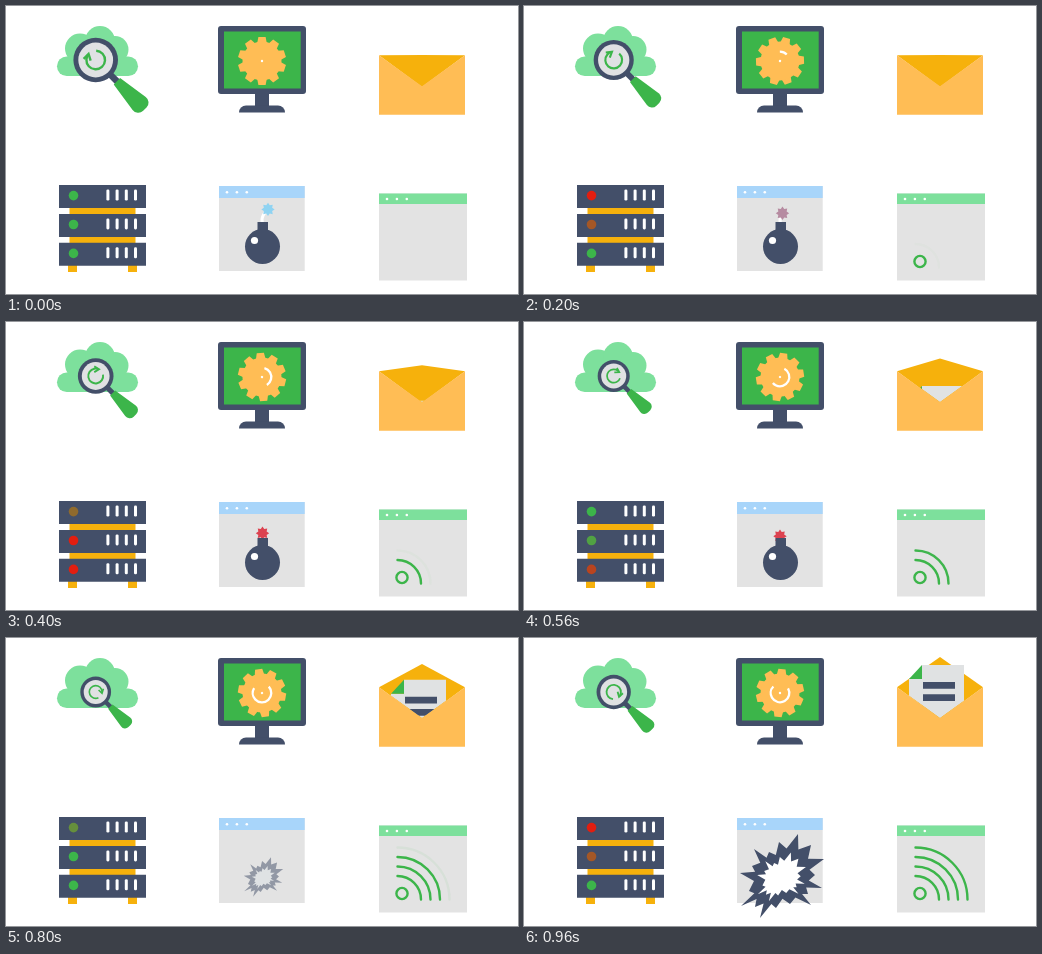
An HTML page with a canvas for the animation above (1 s loop, 512x288 px).

```html
<!DOCTYPE html>
<html lang="en">
<head>
<meta charset="utf-8">
<title>Security icons</title>
<style>
html, body { margin: 0; width: 100%; height: 100%; overflow: hidden; background: #fff; }
canvas { display: block; width: 512px; height: 288px; }
</style>
</head>
<body>
<canvas id="stage" width="512" height="288"></canvas>
<script>
const c = document.getElementById('stage').getContext('2d');
const LOOP = 1000, STEP = 40, TAU = Math.PI * 2, DEG = Math.PI / 180;
const NAVY = '#434f69', GREEN = '#3cb54a', MINT = '#7de09c', AMBER = '#f6b10c',
      ORANGE = '#ffbd55', GREY = '#e3e3e3', PAPER = '#e0e2e3', WHITE = '#fff', SKY = '#a8d5fa';

const clamp = v => Math.max(0, Math.min(1, v));
const ramp = (t, from, to) => clamp((t - from) / (to - from));
const mix = (a, b, k) => `rgb(${a.map((v, i) => Math.round(v + (b[i] - v) * k))})`;

function rect(x, y, x2, y2, color, radius = 0) {
  c.fillStyle = color;
  c.beginPath();
  c.roundRect(x, y, x2 - x, y2 - y, radius);
  c.fill();
}

function disc(x, y, r, color) {
  c.fillStyle = color;
  c.beginPath();
  c.arc(x, y, r, 0, TAU);
  c.fill();
}

function poly(points, color) {
  c.fillStyle = color;
  c.beginPath();
  points.forEach(([x, y]) => c.lineTo(x, y));
  c.closePath();
  c.fill();
}

function arc(x, y, r, from, to, color, width) {
  c.strokeStyle = color;
  c.lineWidth = width;
  c.beginPath();
  c.arc(x, y, r, from, to);
  c.stroke();
}

function group(x, y, draw) {
  c.save();
  c.translate(x, y);
  draw();
  c.restore();
}

function cloud() {
  rect(51, 50.5, 132, 70, MINT, 9.7);
  disc(74, 42.5, 15, MINT);
  disc(94, 35, 15, MINT);
  disc(109, 43.5, 13.5, MINT);
  rect(65, 42, 117, 69, MINT);
}

function magnifier(t) {
  const scale = 0.645 + 0.0005 * Math.abs(t - 710);
  group(89.7, 54, () => {
    c.scale(scale, scale);
    c.save();
    c.rotate(45 * DEG);
    rect(19, -3.2, 32, 3.2, NAVY);
    c.fillStyle = GREEN;
    c.beginPath();
    c.moveTo(30, -4.5);
    c.arcTo(69.5, -10.5, 69.5, 0, 7);
    c.arcTo(69.5, 10.5, 30, 4.5, 7);
    c.lineTo(30, 4.5);
    c.fill();
    c.restore();
    disc(0, 0, 22.3, NAVY);
    disc(0, 0, 17.4, '#e0e1e3');
    // refresh arrow
    c.rotate((-145 + 0.19 * t) * DEG);
    arc(0, 0, 9.3, 58 * DEG, 360 * DEG, GREEN, 2.4);
    c.beginPath();
    c.moveTo(10.5, -6);
    c.lineTo(9.3, 0.8);
    c.lineTo(3.8, -3.4);
    c.stroke();
  });
}

function monitor(t) {
  rect(249, 86, 263, 102, NAVY);
  rect(233, 99.5, 279, 106.5, NAVY, [7, 7, 0, 0]);
  rect(212, 20, 300, 88, NAVY, 3);
  rect(218, 25.5, 294.7, 82.5, GREEN);
  group(256, 55, () => {
    c.rotate(0.08 * t * DEG);
    for (let i = 0; i < 10; i++) {
      poly([[-4.8, -18], [-3.6, -24], [3.6, -24], [4.8, -18]], ORANGE);
      c.rotate(36 * DEG);
    }
    disc(0, 0, 19.5, ORANGE);
    const len = Math.min(255, 0.43 * (t - 90));
    if (len > 0) arc(0, 0, 9.3, -107 * DEG, (len - 107) * DEG, WHITE, 2.3);
    disc(0, 0, 1.2, WHITE);
  });
}

function envelope(t) {
  const apex = 49 - 30 * ramp(t, 270, 960);
  const top = 64 - 0.0925 * (t - 560);
  poly([[373, 49.3], [416, apex], [459, 49.3], [416, 81]], AMBER);
  if (top < 80) {
    c.save();
    c.beginPath();
    c.rect(373, 0, 86, 49);
    c.moveTo(373, 49);
    c.lineTo(459, 49);
    c.lineTo(416, 80);
    c.closePath();
    c.clip();
    group(0, top, () => {
      poly([[398, 0], [440, 0], [440, 60], [385, 60], [385, 14], [398, 14]], PAPER);
      poly([[398, 0], [398, 14], [385, 14]], GREEN);
      rect(399, 17, 431, 23.7, NAVY);
      rect(399, 29.3, 431, 36, NAVY);
    });
    c.restore();
  }
  poly([[373, 49.3], [416, 80.3], [459, 49.3], [459, 108.7], [373, 108.7]], ORANGE);
}

function servers(t) {
  rect(63.5, 200, 129.5, 240, AMBER);
  rect(62, 258, 71, 266, AMBER);
  rect(122, 258, 131, 266, AMBER);
  for (let i = 0; i < 3; i++) {
    const y = 179 + 28.9 * i;
    const u = (t - 100 * i + 760) % 760;
    const red = ramp(u, 0, 160) - ramp(u, 320, 480);
    rect(53, y, 140, y + 23, NAVY);
    disc(67.5, y + 10.6, 4.8, mix([60, 181, 74], [226, 30, 16], red));
    for (let k = 0; k < 4; k++) {
      const x = 100.4 + 9.2 * k;
      rect(x, y + 4.5, x + 3, y + 15.5, WHITE, 1.3);
    }
  }
}

function windowBox(x, y, x2, y2, bar, color) {
  rect(x, y, x2, y2, GREY);
  rect(x, y, x2, bar, color);
  for (let i = 0; i < 3; i++) disc(x + 8 + 9.9 * i, (y + bar) / 2 + 0.2, 1.3, WHITE);
}

const fusePoint = t => [256 + 6 * (1 - t / 560) ** 2, 203.4 + 0.0194 * t];

function spark(t) {
  const [x, y] = fusePoint(t);
  const heat = 0.5 - 0.5 * Math.cos(TAU * t / 160);
  const pts = [];
  for (let i = 0; i < 16; i++) {
    const r = i % 2 ? 4.5 : 6.7, a = i * TAU / 16;
    pts.push([x + r * Math.cos(a), y + r * Math.sin(a)]);
  }
  c.strokeStyle = WHITE;
  c.lineWidth = 3;
  c.beginPath();
  for (let s = t; s <= 680; s += STEP) c.lineTo(...fusePoint(s));
  c.stroke();
  poly(pts, mix([143, 211, 242], [220, 66, 80], heat));
}

function bomb(t) {
  c.save();
  c.globalAlpha = 1 - ramp(t, 640, 760);
  if (t < 680) spark(t);
  rect(251.5, 216, 262, 228, NAVY);
  disc(256.5, 240.5, 17.5, NAVY);
  disc(248.5, 234.5, 3.6, WHITE);
  c.restore();
}

// spike tips relative to the blast centre
const TIPS = [[17, -44], [30, -33], [43, -19], [34, -3], [41, 10], [27, 16], [30, 27], [9, 26], [-5, 30],
  [-21, 40], [-26, 29], [-40, 28], [-32, 13], [-41, -5], [-29, -12], [-27, -29], [-12, -26], [-2, -36]];
const BLAST = TIPS.flatMap((p, i) => {
  const q = TIPS[(i + 1) % TIPS.length];
  return [p, [(p[0] + q[0]) * 0.37, (p[1] + q[1]) * 0.37]];
});

function blast(t) {
  const scale = (t - 658) / 302;
  if (scale <= 0) return;
  group(257, 240, () => {
    c.globalAlpha = ramp(t, 658, 940);
    c.scale(scale, scale);
    poly(BLAST, NAVY);
    c.scale(0.58, 0.58);
    c.globalAlpha = 1;
    poly(BLAST, mix([223, 226, 228], [255, 255, 255], ramp(t, 800, 940)));
  });
}

function feed(t) {
  c.save();
  c.lineCap = 'round';
  for (let i = 0; i < 5; i++) {
    c.globalAlpha = ramp(t, 197 * i, 197 * i + 170);
    if (i) arc(391.5, 261.5, 14 + 9.5 * i, -Math.PI / 2, 0, GREEN, 2.4);
    else arc(396, 255.5, 5.6, 0, TAU, GREEN, 2.4);
  }
  c.restore();
}

function draw(t) {
  c.fillStyle = WHITE;
  c.fillRect(0, 0, 512, 288);
  cloud();
  magnifier(t);
  monitor(t);
  envelope(t);
  servers(t);
  windowBox(213, 180, 298.7, 265, 192, SKY);
  bomb(t);
  blast(t);
  windowBox(373, 187.5, 461, 274.5, 198, MINT);
  feed(t);
}

const start = performance.now();
function tick() {
  const ms = (performance.now() - start) % LOOP;
  draw(Math.floor(ms / STEP) * STEP);
  requestAnimationFrame(tick);
}
tick();
</script>
</body>
</html>
```
